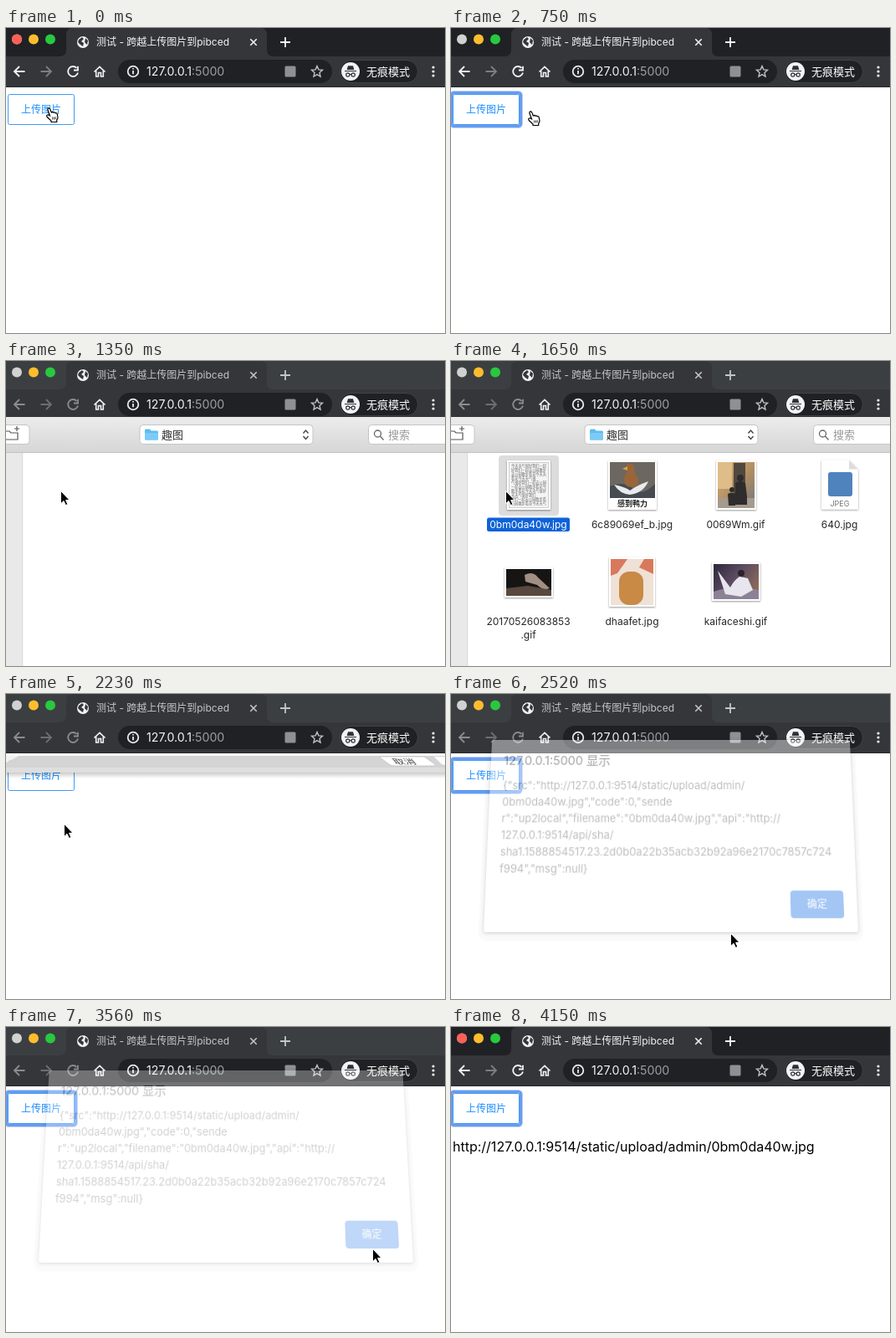
These frames come from a looping animation (525x365 px, 4300 ms). An HTML page:

```html
<!DOCTYPE html>
<html lang="zh">
<head>
<meta charset="utf-8">
<title>上传图片</title>
<style>
html, body { margin: 0; width: 100%; height: 100%; overflow: hidden; background: #fff; }
svg { position: absolute; left: 0; top: 0; width: 525px; height: 365px; }
text { font-family: Inter, "Noto Sans CJK SC", "Noto Sans CJK", sans-serif; white-space: pre; }
.mid { text-anchor: middle; }
#stage { --strip: #3c3f41; --title: #c3c5c8; --nav: #8b8c8f; --next: #6d6e71; }
#stage.live { --strip: #202124; --title: #f1f3f4; --nav: #f1f3f4; --next: #7d7e82; }
.line { fill: none; stroke-width: 1.8; }
#alert { transform-origin: 263px 297px; }
</style>
</head>
<body>
<svg id="stage" viewBox="0 0 525 365">
  <defs>
    <linearGradient id="bar" x2="0" y2="1"><stop stop-color="#ececec"/><stop offset="1" stop-color="#d6d6d6"/></linearGradient>
    <linearGradient id="wall" x2="1" y2="1"><stop stop-color="#d6b27c"/><stop offset=".55" stop-color="#b08c62"/><stop offset="1" stop-color="#6f7880"/></linearGradient>
    <linearGradient id="dusk" x2="1" y2=".6"><stop stop-color="#2d2838"/><stop offset=".5" stop-color="#5a4a62"/><stop offset="1" stop-color="#8a6a58"/></linearGradient>
    <linearGradient id="shade" x2="0" y2="1"><stop stop-color="#000" stop-opacity=".2"/><stop offset="1" stop-color="#000" stop-opacity="0"/></linearGradient>
    <filter id="soft" x="-20%" y="-20%" width="140%" height="150%"><feDropShadow dx="0" dy="1" stdDeviation="1" flood-opacity=".4"/></filter>
  </defs>

  <!-- page -->
  <rect width="525" height="365" fill="#fff"/>
  <g id="ring" class="part" fill="none">
    <rect x="0.5" y="77.5" width="83" height="40" rx="3" stroke="#b9d0f8" stroke-width="5"/>
    <rect x="0.5" y="77.5" width="83" height="40" rx="3" stroke="#689bf0" stroke-width="3"/>
  </g>
  <rect x="2.5" y="79.5" width="79" height="36" rx="2" fill="#fff" stroke="#3d9bf5"/>
  <text x="18" y="102.3" font-size="12" fill="#1e90ff">上传图片</text>
  <text id="link" class="part" x="2" y="149" font-size="16" fill="#000">http://127.0.0.1:9514/static/upload/admin/0bm0da40w.jpg</text>

  <!-- browser frame -->
  <rect width="525" height="35" fill="var(--strip)"/>
  <path d="M64 34Q72 34 72 26V8Q72 0 80 0H304Q312 0 312 8V26Q312 34 320 34Z" fill="#35363a"/>
  <rect y="34" width="525" height="36.5" fill="#35363a"/>
  <rect y="70" width="525" height="1" fill="#27282b"/>
  <circle cx="13" cy="13.5" r="6" fill="#d1d1d1"/>
  <circle id="red" class="part" cx="13" cy="13.5" r="6" fill="#ff5f57"/>
  <circle cx="33" cy="13.5" r="6" fill="#ffbd2e"/>
  <circle cx="53" cy="13.5" r="6" fill="#28c940"/>
  <circle cx="92" cy="17" r="7" fill="#f1f3f4"/>
  <path d="M87 14L91 11L93 13L90 16L93 18L92 22L89 20L86 17ZM95 12L98 15L97 20L94 17Z" fill="#35363a"/>
  <text x="108" y="21.3" font-size="12" fill="var(--title)">测试 - 跨越上传图片到pibced</text>
  <g stroke="var(--title)" class="line">
    <path d="M292.3 13.3l7.4 7.4M299.7 13.3l-7.4 7.4" stroke-width="1.6"/>
    <path d="M328 17h12M334 11v12"/>
  </g>
  <g class="line" stroke="var(--nav)">
    <path d="M22.5 52H10.5M16 46l-6 6l6 6"/>
    <path d="M84.5 47.8A6 6 0 1 0 86 53.5M86 45.8V50.5H81"/>
    <path d="M41.5 52H53.5M48 46l6 6l-6 6" stroke="var(--next)"/>
    <path d="M105.5 52.5L112 46.3L118.5 52.5M107.7 51V58H110.5V53.5H113.5V58H116.3V51" stroke="#f1f3f4" stroke-width="1.6"/>
  </g>
  <rect x="134" y="38" width="256" height="28" rx="14" fill="#202124"/>
  <g class="line" stroke="#e8eaed" stroke-width="1.4">
    <circle cx="152" cy="52" r="6.3"/>
    <path d="M152 51v4.3M152 48v1.6"/>
  </g>
  <text x="168" y="57" font-size="14.2" fill="#f1f3f4">127.0.0.1<tspan fill="#9aa0a6">:5000</tspan></text>
  <rect x="333.5" y="45.5" width="13" height="13" rx="1.5" fill="#8d9196"/>
  <path d="M372 45.6l1.9 4.3l4.6 .4l-3.5 3.1l1 4.6l-4-2.4l-4 2.4l1-4.6l-3.5-3.1l4.6-.4Z" fill="none" stroke="#bdc1c6" stroke-width="1.4"/>
  <rect x="399.5" y="38.5" width="93" height="27" rx="13.5" fill="#202124" stroke="#414246"/>
  <circle cx="412" cy="52" r="11" fill="#f1f3f4"/>
  <path d="M405 51h14v1h-14ZM407.6 50l1.4-4.8h6l1.4 4.8Z" fill="#303134"/>
  <g fill="none" stroke="#303134" stroke-width="1.2"><circle cx="408.8" cy="56" r="2.1"/><circle cx="415.2" cy="56" r="2.1"/><path d="M411 55.5h2"/></g>
  <text x="431" y="56.9" font-size="13" font-weight="500" fill="#fff">无痕模式</text>
  <g fill="#f1f3f4"><circle cx="511" cy="47" r="1.6"/><circle cx="511" cy="52" r="1.6"/><circle cx="511" cy="57" r="1.6"/></g>
  <path id="edge" class="part" d="M524 67h1v4h-1ZM524 195h1v5h-1Z" fill="#aaa"/>

  <!-- file sheet -->
  <g id="sheet" class="part">
    <rect y="67" width="525" height="298" fill="#fff"/>
    <rect y="109" width="20" height="256" fill="#e9e9e9"/>
    <rect x="19.5" y="109" width=".7" height="256" fill="#d2d2d2"/>
    <rect y="67" width="525" height="42" fill="url(#bar)"/>
    <rect y="109" width="525" height="1" fill="#c2c2c2"/>
    <g fill="#fff" stroke="#c5c5c5">
      <rect x="-9.5" y="76.5" width="37.5" height="23" rx="4"/>
      <rect x="160" y="76.5" width="207" height="23" rx="4"/>
      <rect x="433.5" y="76.5" width="110" height="23" rx="4"/>
    </g>
    <path d="M0 84h4l2 2h8v8H0M10 81h6M13 78v6" fill="none" stroke="#555" stroke-width="1.2"/>
    <path d="M166 83q0-1.5 1.5-1.5h4.5l1.5 2h7q1.5 0 1.5 1.5v8q0 1.5-1.5 1.5h-13q-1.500 0-1.500-1.500Z" fill="#5ebcf0"/>
    <rect x="166" y="86" width="16" height="8.500" rx="1" fill="#7acbf6"/>
    <text x="186" y="93" font-size="13" fill="#333">趣图</text>
    <path d="M355.500 86.500l3-3.500l3 3.500M355.500 90l3 3.500l3-3.500" fill="none" stroke="#444" stroke-width="1.400"/>
    <g fill="none" stroke="#666" stroke-width="1.300"><circle cx="444.500" cy="87" r="4"/><path d="M447.500 90l4 4.500"/></g>
    <text x="457" y="93" font-size="13" fill="#9a9a9a">搜索</text>
  </g>

  <g id="files" class="part">
    <rect id="pick" class="part" x="57" y="113" width="72" height="72" rx="4" fill="#dcdcdc"/>
    <g filter="url(#soft)" fill="#fff">
      <rect x="67" y="119" width="52" height="59"/>
      <rect x="188" y="119" width="58" height="59"/>
      <rect x="317" y="119" width="48" height="59"/>
      <path d="M443 118.500h33l11 11v48h-44Z"/>
      <rect x="64" y="247" width="58" height="36"/>
      <rect x="189" y="235" width="55" height="59"/>
      <rect x="312" y="241" width="58" height="46"/>
    </g>
    <rect x="69.500" y="121.500" width="47" height="54" fill="#f4f4f4" stroke="#bbb" stroke-width=".7"/>
    <g id="note" font-size="4.200" fill="#666"></g>

    <rect x="190" y="121" width="54" height="43" fill="#6c6861"/>
    <path d="M190 150q18-7 28 3t26-6v17h-54Z" fill="#454b50"/>
    <path d="M195 148q14 3 19 7q8-6 22-11q-6 14-22 16q-12-1-19-12Z" fill="#e8eaee"/>
    <path d="M211 123q8-2 8 6q0 5 4 10q4 9-5 12q-10 1-11-8q0-6 4-10Z" fill="#9a6538"/>
    <path d="M211 126l-6 3l6 2Z" fill="#e0a53a"/>
    <text x="217" y="173.500" font-size="9" font-weight="600" class="mid" fill="#222">感到鸭力</text>

    <rect x="319" y="121" width="44" height="55" fill="url(#wall)"/>
    <path d="M319 121h17v32h-17Z" fill="#dfbd88"/>
    <path d="M338 122h14v40h-14Z" fill="#51483f"/>
    <path d="M319 164h44v12h-44Z" fill="#a49a8d"/>
    <g fill="#2f2c2d"><circle cx="346" cy="140" r="4"/><path d="M340 146q6-4 12 0l2 16v10h-14Z"/><circle cx="336" cy="154" r="3"/><path d="M331 159q5-3 9 0v14h-8Z"/></g>

    <path d="M476 118.500v11h11Z" fill="#ddd"/>
    <rect x="451" y="133" width="29" height="29" rx="3" fill="#4f83bd"/>
    <text x="465" y="174" font-size="9" class="mid" fill="#777">JPEG</text>

    <rect x="66" y="249" width="54" height="32" fill="#171414"/>
    <path d="M66 272l26-3l28 5v7h-54Z" fill="#58483d"/>
    <path d="M88 256q10-5 16 3l14 13q-8 3-15-4l-14-4Z" fill="#a08f82"/>

    <rect x="191" y="237" width="51" height="55" fill="#efe1d6"/>
    <path d="M191 237h20l-12 17l-8 3ZM242 237v18l-17-8l6-10Z" fill="#d9795c"/>
    <rect x="201" y="252" width="29" height="40" rx="12" fill="#c88a45"/>

    <rect x="314" y="243" width="54" height="42" fill="url(#dusk)"/>
    <path d="M314 276q26-9 54-2v11h-54Z" fill="#8b8295"/>
    <path d="M319 251l15 20q4-8 11-13l10 2l6 14l-14 8l-19-3Z" fill="#e7e5ed"/>
    <circle cx="347" cy="254" r="4" fill="#2b2227"/>

    <g font-size="12" fill="#262626" class="mid" id="names"></g>
    <g id="pickName" class="part">
      <rect x="43" y="187.500" width="99" height="16.500" rx="2.500" fill="#0f62d9"/>
      <text x="92.500" y="200" font-size="12" class="mid" fill="#fff">0bm0da40w.jpg</text>
    </g>
  </g>

  <!-- sheet folding away -->
  <g id="foldHalf" class="part">
    <path d="M0 67h525v83H0Z" fill="#fff"/>
    <path d="M0 114h525v36H0Z" fill="#dfdfdf"/>
    <path d="M0 113.500h525" stroke="#c4c4c4"/>
    <path d="M438 124h60l8 16h-60Z" fill="#fff" stroke="#c5c5c5"/>
    <text transform="translate(472 137) skewX(20) scale(1 .8)" font-size="13" class="mid" fill="#333">取消</text>
    <path d="M510 124h15v16h-7Z" fill="#fff"/>
    <rect y="150" width="525" height="9" fill="url(#shade)"/>
  </g>
  <g id="foldEnd" class="part">
    <rect y="71" width="525" height="4" fill="#fff"/>
    <path d="M0 82L15 74H525V94H0Z" fill="#d4d4d4"/>
    <path d="M0 88h525v6H0Z" fill="#dedede"/>
    <path d="M0 74h15L0 82Z" fill="#f2f2f2"/>
    <path d="M446 75h54l13 9q1 2-2 2h-46q-4 0-7-2Z" fill="#fff" stroke="#bdbdbd" stroke-width=".7"/>
    <text transform="translate(479 83.500) skewX(40) scale(1 .65)" font-size="13" class="mid" fill="#444">取消</text>
    <path d="M512 75h13v10q-4 0-8-5Z" fill="#fff"/>
    <rect y="94" width="525" height="7" fill="url(#shade)"/>
  </g>
</svg>

<svg id="alert" class="part" viewBox="0 0 525 365">
  <rect x="33" y="64" width="460" height="243" rx="10" fill="#000" opacity=".045"/>
  <rect x="39" y="67" width="448" height="230" rx="3" fill="#fff" style="filter:drop-shadow(0 1px 2px rgba(0,0,0,.45))"/>
  <text x="55" y="98.500" font-size="15" fill="#202124">127.0.0.1:5000 显示</text>
  <g id="body" font-size="13.100" fill="#5f6368"></g>
  <rect x="407" y="249" width="64" height="32" rx="4" fill="#2676e6"/>
  <text x="439" y="269.400" font-size="12" font-weight="500" class="mid" fill="#fff">确定</text>
</svg>

<svg viewBox="0 0 525 365">
  <g id="arrow"><path d="M.5 .5V15.800L4 12.500L6.400 17.600L8.900 16.500L6.600 11.500H11Z" fill="#000" stroke="#fff"/></g>
  <g id="hand">
    <path d="M4.400 9.800L2 3.300Q1.500 1 3.200 .8Q4.500 .8 5 2.600L6.300 6Q7.600 4.900 8.700 6.200Q10.100 5.400 11.100 6.800Q12.600 6.200 13.200 8L14 12Q14 14 12.700 15V17.500H6V16L1.200 11.500Q0 9.600 1.600 9Q3 8.700 4.400 9.800Z" fill="#fff" stroke="#000" stroke-width="1.200"/>
    <path d="M7.600 11.500v3M9.500 11.500v3M11.300 11.300v3" stroke="#000" stroke-width=".8"/>
  </g>
</svg>

<script>
const LOOP = 4300;
const $ = id => document.getElementById(id);

function addText(parent, x, y, str) {
  const el = document.createElementNS('http://www.w3.org/2000/svg', 'text');
  el.setAttribute('x', x);
  el.setAttribute('y', y);
  el.textContent = str;
  $(parent).append(el);
}

[
  [92.5, 200, '0bm0da40w.jpg'], [216.5, 200, '6c89069ef_b.jpg'],
  [340.5, 200, '0069Wm.gif'], [464.5, 200, '640.jpg'],
  [92.5, 316, '20170526083853'], [92.5, 332, '.gif'],
  [216.5, 316, 'dhaafet.jpg'], [340.5, 316, 'kaifaceshi.gif']
].forEach(n => addText('names', ...n));

[
  '{"src":"http://127.0.0.1:9514/static/upload/admin/',
  '0bm0da40w.jpg","code":0,"sende',
  'r":"up2local","filename":"0bm0da40w.jpg","api":"http://',
  '127.0.0.1:9514/api/sha/',
  'sha1.1588854517.23.2d0b0a22b35acb32b92a96e2170c7857c724',
  'f994","msg":null}'
].forEach((line, i) => addText('body', 55, 128 + 20 * i, line));

const prose = '今天天气很好我们一起去公园散步看花';
for (let i = 0; i < 10; i++) {
  const k = i * 5 % prose.length;
  addText('note', 72, 127 + 5 * i, (prose + prose).slice(k, k + (i % 4 === 3 ? 7 : 10)));
}

// [start ms, visible parts, pointer, x, y]
const steps = [
  [0, 'live red', 'hand', 48, 95],
  [450, 'live red ring', 'hand', 48, 95],
  [600, 'live ring', 'hand', 48, 95],
  [750, 'live ring', 'hand', 92, 99],
  [900, 'live ring', 'hand', 150, 106],
  [1050, 'live ring edge', 'hand', 194, 111],
  [1200, 'live sheet', 'arrow', 120, 136],
  [1350, 'sheet', 'arrow', 65, 155],
  [1500, 'sheet files', 'arrow', 65, 155],
  [1650, 'sheet files pick pickName', 'arrow', 65, 155],
  [1790, 'foldHalf', 'arrow', 65, 155],
  [2230, 'foldEnd', 'arrow', 69, 155],
  [2380, 'ring', 'arrow', 190, 207],
  [2520, 'ring alert opening', 'arrow', 334, 286],
  [2670, 'ring alert', 'arrow', 334, 286],
  [2820, 'ring alert', 'arrow', 405, 313],
  [2970, 'ring alert', 'arrow', 433, 295],
  [3120, 'ring alert', 'arrow', 441, 269],
  [3270, 'ring alert', 'arrow', 438, 265],
  [3560, 'ring alert closing', 'arrow', 438, 265],
  [3710, 'live red ring link', 'arrow', 486, 313],
  [3850, 'live red ring link', 'arrow', 498, 351],
  [4000, 'live red ring link', 'arrow', 499, 362],
  [4150, 'live red ring link', '', 0, 0]
];

// Keystone tilt: narrower at the top, bottom edge fixed
const tilt = (k, dy) =>
  `translateY(${dy}px) matrix3d(1,0,0,0, 0,${1 + k},0,${-k / 230}, 0,0,1,0, 0,0,0,1)`;

const parts = [...document.querySelectorAll('.part')];
let shown;

function draw() {
  const t = performance.now() % LOOP;
  const step = steps.findLast(s => s[0] <= t);
  if (step !== shown) {
    shown = step;
    const [, list, pointer, x, y] = step;
    const on = new Set(list.split(' '));
    parts.forEach(p => p.style.display = on.has(p.id) ? '' : 'none');
    $('stage').classList.toggle('live', on.has('live'));
    const box = $('alert').style;
    box.transform = on.has('opening') ? tilt(.047, -12) : on.has('closing') ? tilt(.06, -15) : 'none';
    box.opacity = on.has('opening') ? .42 : on.has('closing') ? .3 : 1;
    for (const id of ['arrow', 'hand']) {
      $(id).style.display = id === pointer ? '' : 'none';
      $(id).setAttribute('transform', `translate(${x} ${y})`);
    }
  }
  requestAnimationFrame(draw);
}
draw();
</script>
</body>
</html>
```
